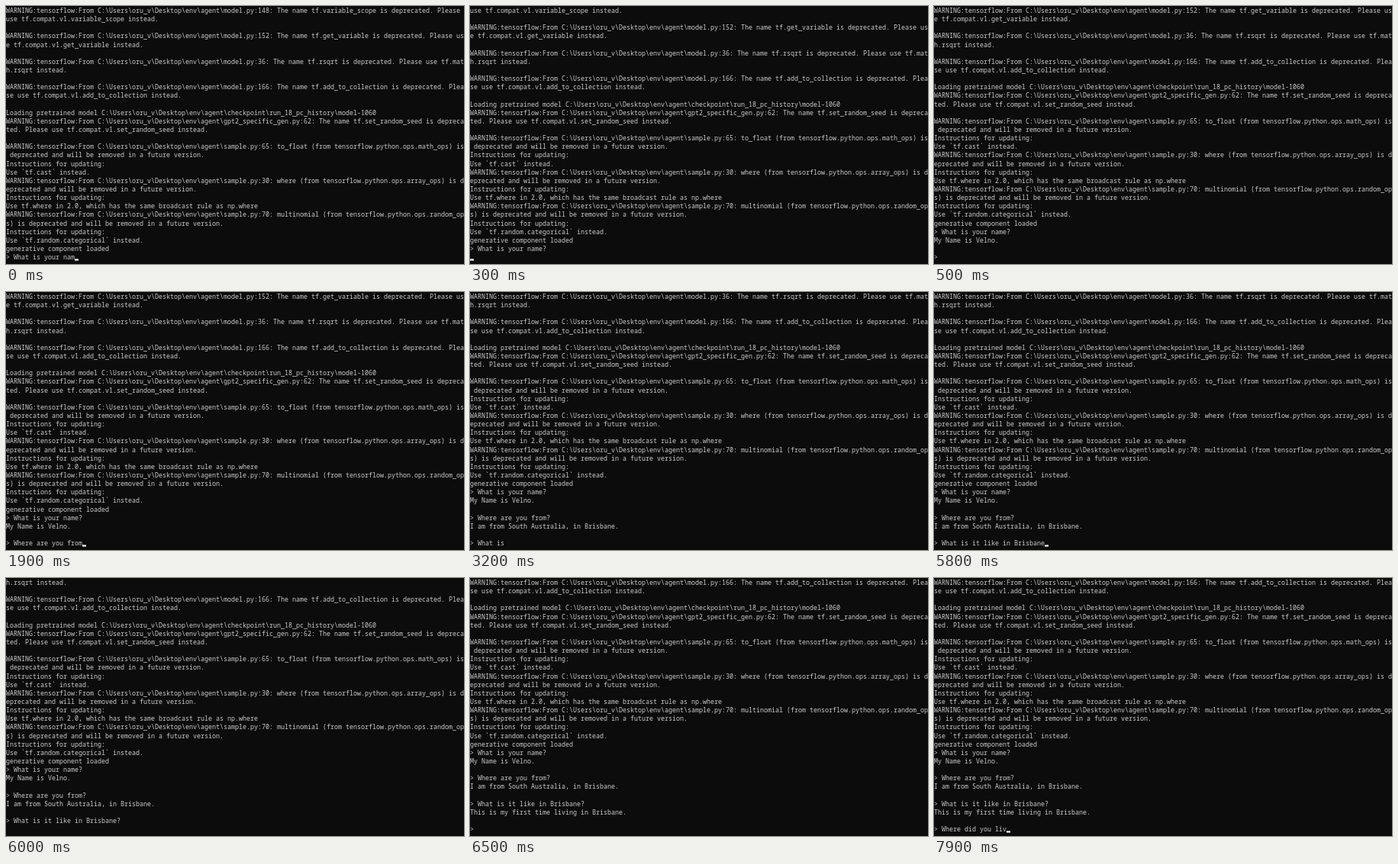
Recreate the animation shown at these times as an HTML page with a canvas. Size 600 by 338 pixels, loop 8 s.

```html
<!DOCTYPE html>
<html lang="en">
<head>
<meta charset="utf-8">
<title>Terminal chat</title>
<style>
  html, body { margin: 0; width: 100%; height: 100%; overflow: hidden; background: #0c0c0c; }
  canvas { display: block; }
</style>
</head>
<body>
<canvas id="screen" width="600" height="338"></canvas>
<script>
const ctx = document.getElementById('screen').getContext('2d', { alpha: false });
const LOOP = 8000, TICK = 100;
const COLS = 120, ROWS = 30, CELL = 5, PITCH = 11.14, BASELINE = 9;

const warn = (place, message) =>
  'WARNING:tensorflow:From C:\\Users\\oru_v\\Desktop\\env\\agent\\' + place + ': ' + message + '\n';
const renamed = (place, name, replacement) =>
  warn(place, `The name tf.${name} is deprecated. Please use tf.${replacement} instead.\n`);
const removed = (place, name, module, advice) =>
  warn(place, `${name} (from tensorflow.python.ops.${module}) is deprecated and will be removed ` +
    `in a future version.\nInstructions for updating:\n${advice}`);

const bootLog =
  renamed('model.py:148', 'variable_scope', 'compat.v1.variable_scope') +
  renamed('model.py:152', 'get_variable', 'compat.v1.get_variable') +
  renamed('model.py:36', 'rsqrt', 'math.rsqrt') +
  renamed('model.py:166', 'add_to_collection', 'compat.v1.add_to_collection') +
  'Loading pretrained model C:\\Users\\oru_v\\Desktop\\env\\agent\\checkpoint\\run_18_pc_history\\model-1060\n' +
  renamed('gpt2_specific_gen.py:62', 'set_random_seed', 'compat.v1.set_random_seed') +
  removed('sample.py:65', 'to_float', 'math_ops', 'Use `tf.cast` instead.') +
  removed('sample.py:30', 'where', 'array_ops', 'Use tf.where in 2.0, which has the same broadcast rule as np.where') +
  removed('sample.py:70', 'multinomial', 'random_ops', 'Use `tf.random.categorical` instead.') +
  'generative component loaded\n> What is your nam';

// Each entry: start time, text, characters per tick
const reply = (at, text) => [at, text + '\n\n> ', Infinity];
const session = [
  [100, 'e?\n', 1],
  reply(400, 'My Name is Velno.'),
  [1100, 'Where are you from', 2],
  [2000, '?\n', 2],
  reply(2100, 'I am from South Australia, in Brisbane.'),
  [2900, 'What is ', 2],
  [3600, 'it ', 1],
  [4500, 'like in ', 2],
  [5100, 'Brisbane?\n', 1],
  reply(6500, 'This is my first time living in Brisbane.'),
  [7300, 'Where did you liv', 17 / 7],
];

// Times at which the cursor switches; it is lit at the start
const blinks = [400, 600, 800, 900, 2300, 2500, 2700, 2900, 3200, 3400, 4000,
  4200, 4400, 4500, 5000, 5100, 6000, 6200, 6400, 6700, 6900, 7100];

function textAt(time) {
  let text = bootLog;
  for (const [at, part, rate] of session) {
    if (time < at) break;
    const ticks = Math.floor((time - at) / TICK + 1e-6) + 1;
    text += part.slice(0, Math.round(ticks * rate));
  }
  return text;
}

function wrap(text) {
  return text.split('\n').flatMap(line => {
    const rows = [line.slice(0, COLS)];
    for (let i = COLS; i < line.length; i += COLS) rows.push(line.slice(i, i + COLS));
    return rows;
  });
}

function draw(time) {
  ctx.fillStyle = '#0c0c0c';
  ctx.fillRect(0, 0, 600, 338);
  ctx.font = '8.3333px "Noto Sans Mono", "DejaVu Sans Mono", monospace';
  ctx.fillStyle = '#cccccc';

  const rows = wrap(textAt(time)).slice(-ROWS);
  rows.forEach((row, r) => {
    for (let c = 0; c < row.length; c++) {
      if (row[c] !== ' ') ctx.fillText(row[c], c * CELL, BASELINE + r * PITCH);
    }
  });

  const lit = blinks.filter(t => t <= time).length % 2 === 0;
  if (lit) {
    ctx.fillStyle = '#f2f2f2';
    ctx.fillRect(rows[rows.length - 1].length * CELL, 331.3, CELL, 2.3);
  }
}

const start = performance.now();
function loop() {
  draw((performance.now() - start) % LOOP);
  requestAnimationFrame(loop);
}
loop();
</script>
</body>
</html>
```
